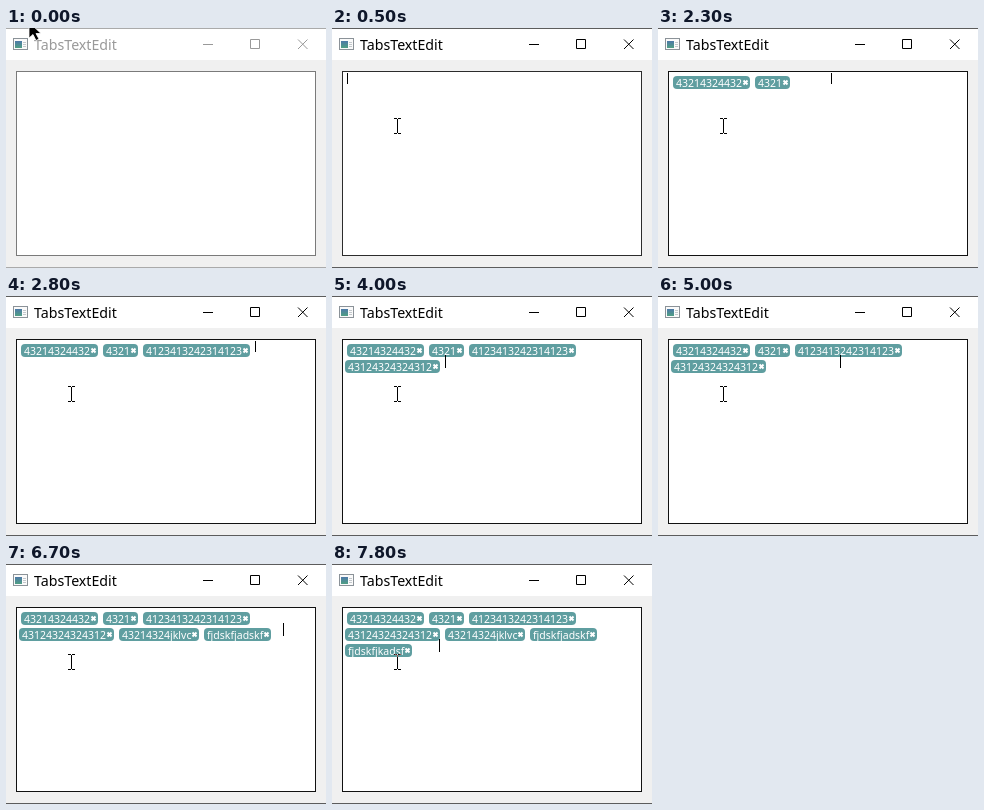
Recreate the animation shown at these times as an HTML page. Size 320x240 px, loop 8000 ms.

```html
<!DOCTYPE html>
<html lang="en">
<head>
<meta charset="utf-8">
<title>TabsTextEdit</title>
<style>
  html, body { margin: 0; width: 100%; height: 100%; overflow: hidden; background: #f0f0f0; }
  svg { display: block; width: 320px; height: 240px; }
  text { font-family: "Noto Sans", "Open Sans", sans-serif; }
  #title { font-size: 14.2px; }
  .tag text { font-size: 10.5px; fill: #fff; }
  #beam { mix-blend-mode: difference; }
</style>
</head>
<body>
<svg viewBox="0 0 320 240">
  <defs>
    <clipPath id="page"><rect x="11" y="45" width="298" height="182"/></clipPath>
    <linearGradient id="pane" x2="0" y2="1">
      <stop stop-color="#4d78a8"/><stop offset="1" stop-color="#4f9f83"/>
    </linearGradient>
  </defs>
  <rect width="320" height="240" fill="#f0f0f0"/>
  <rect width="320" height="32" fill="#fff"/>
  <path id="edges" d="M0 .5H320M0 239.5H320"/>
  <g id="icon">
    <rect x="7.5" y="10.5" width="14" height="11" fill="#fafafa" stroke="#8b9298"/>
    <rect x="9" y="13" width="7" height="7" fill="url(#pane)"/>
    <path d="M17 14.5h3M17 16.5h3M17 18.5h3" stroke="#c3c8cc"/>
  </g>
  <text id="title" x="28" y="22">TabsTextEdit</text>
  <path id="buttons" fill="none" d="M197 16.5h10M244.5 11.5h9v9h-9zM292 11.5l9.5 9.5M301.5 11.5l-9.5 9.5"/>
  <rect id="frame" x="10.5" y="43.5" width="299" height="184" fill="#fff"/>
  <g id="tags"></g>
  <rect id="caret" width="1" height="13" clip-path="url(#page)"/>
  <path id="beam" fill="none" stroke="#fff" d="M-3 -7.5H0M1 -7.5H4M.5 -7V7M-3 7.5H0M1 7.5H4"/>
  <path id="arrow" stroke="#fff" stroke-width=".8" d="M0 0V16L4 12.5L7 18.5L10 17L7 11.5H12Z"/>
</svg>
<script>
const LOOP = 8000, STEP = 100, ACTIVE_AT = 500, ROW = 16, GAP = 5, PADDING = 11;
const LETTERS = { f: 4, j: 3, s: 5, k: 5, l: 2, c: 5 };
const $ = id => document.getElementById(id);
const advance = text => [...text].reduce((sum, c) => sum + (LETTERS[c] || 6), 0);

// Each run: start time, then characters typed after every step.
// wrapAt: length at which the word moves to the next row.
const words = [
  { text: '43214324432', runs: [[900, 3, 5, 7, 9, 11]], done: 1500 },
  { text: '4321', runs: [[1700, 1], [1900, 3, 4]], done: 2100 },
  { text: '4123413242314123', runs: [[2200, 3, 6, 8, 11, 13, 16]], done: 2800 },
  { text: '43124324324312', runs: [[3000, 3], [3200, 5, 7], [3500, 10, 12, 14]], wrapAt: 10, done: 4000 },
  { text: '43214324jklvc', runs: [[4100, 2, 4, 6, 7, 8, 10], [4800, 11], [5000, 13]], done: 5200 },
  { text: 'fjdskfjadskf', runs: [[5600, 2, 5, 7, 10, 12]], done: 6200 },
  { text: 'fjdskfjkadsf', runs: [[6700, 2, 5], [7000, 7, 11, 12]], wrapAt: 11, done: 7400 },
  { text: 'fjdsf', runs: [[7700, 3, 5]], done: Infinity }
];

function layOut() {
  let x = 15, row = 0;
  for (const word of words) {
    word.typing = { x, row };
    if (word.wrapAt) { x = 13; row++; }
    Object.assign(word, { x, row });
    const width = advance(word.text) + PADDING;
    if (word.done < LOOP) word.node = makeTag(word, width);
    x += width + GAP;
  }
}

function makeTag({ text, x, row }, width) {
  const y = 48 + ROW * row, cx = x + width - 4.5, cy = y + 6.5;
  $('tags').insertAdjacentHTML('beforeend', `<g class="tag">
    <rect x="${x}" y="${y}" width="${width}" height="13" rx="4" fill="#5f9ea0"/>
    <text x="${x + 3}" y="${y + 11}">${text}</text>
    <path d="M${cx - 2} ${cy - 2}l4 4m0 -4l-4 4" stroke="#fff" stroke-width="2"/></g>`);
  return $('tags').lastElementChild;
}

function typedCount(word, t) {
  let count = 0;
  for (const [start, ...counts] of word.runs) {
    if (t >= start) count = counts[Math.min(counts.length - 1, Math.floor((t - start) / STEP))];
  }
  return count;
}

function drawCaret(t) {
  const word = words.find(w => t < w.done);
  const count = typedCount(word, t);
  const wrapped = count >= word.wrapAt;
  const { x, row } = wrapped ? word : word.typing;
  $('caret').setAttribute('x', x + advance(word.text.slice(0, count)));
  $('caret').setAttribute('y', 43 + ROW * row + (wrapped ? 6 : 0));
  $('caret').style.display = t >= ACTIVE_AT ? '' : 'none';
}

function drawPointer(t) {
  const p = Math.min(1, Math.floor(t / STEP) / 4);
  const ease = p * p * (3 - 2 * p);
  const x = Math.round(23 + 42 * ease), y = Math.round(-6 + 104 * ease);
  const inside = y > 43;
  $('arrow').style.display = inside ? 'none' : '';
  $('beam').style.display = inside ? '' : 'none';
  for (const id of ['arrow', 'beam']) $(id).setAttribute('transform', `translate(${x} ${y})`);
}

function drawWindow(t) {
  const active = t >= ACTIVE_AT;
  $('title').setAttribute('fill', active ? '#000' : '#999');
  $('buttons').setAttribute('stroke', active ? '#000' : '#999');
  $('edges').setAttribute('stroke', active ? '#5c5c5c' : '#aaa');
  $('frame').setAttribute('stroke', t >= 600 ? '#111' : active ? '#2c2c2c' : '#7a7a7a');
}

function draw(t) {
  drawWindow(t);
  drawPointer(t);
  drawCaret(t);
  for (const { node, done } of words) if (node) node.style.display = t >= done ? '' : 'none';
}

layOut();
const began = performance.now();
function tick() {
  draw((performance.now() - began) % LOOP);
  requestAnimationFrame(tick);
}
tick();
</script>
</body>
</html>
```
